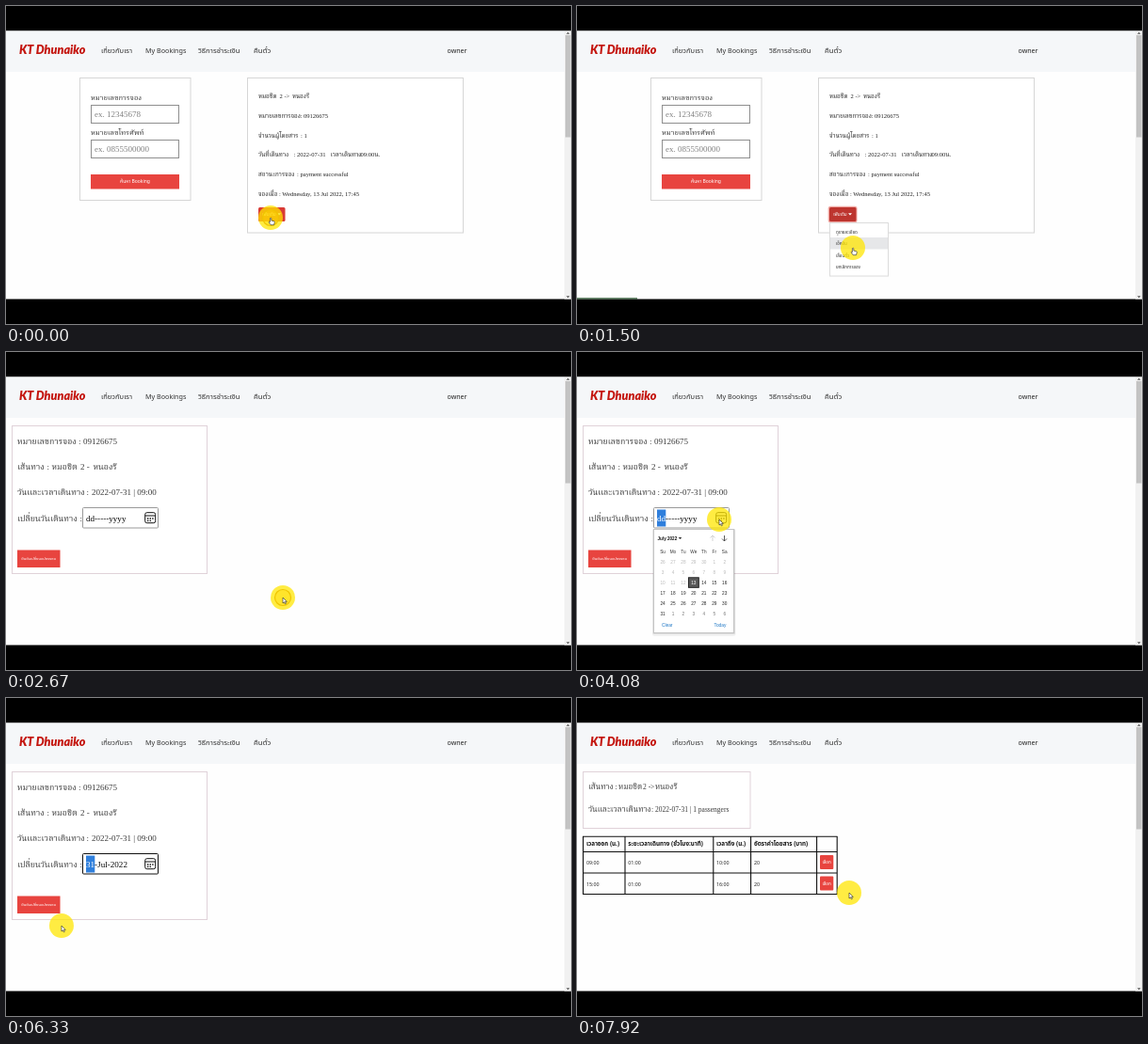
Recreate the animation shown at these times as an HTML page. Size 600 by 338 pixels, loop 8000 ms.

```html
<!DOCTYPE html>
<html lang="th">
<head>
<meta charset="utf-8">
<title>Booking</title>
<style>
html, body { margin: 0; width: 100%; height: 100%; overflow: hidden; background: #000; }
svg { display: block; width: 600px; height: 338px; }
.serif { font-family: "Liberation Serif", "Noto Serif Thai", "Noto Serif", serif; }
.sans { font-family: "Noto Sans", "Noto Sans Thai Looped", "Noto Sans Thai", sans-serif; }
.ui { font-family: "Liberation Sans", sans-serif; }
.brand { font-family: Lato, sans-serif; font-weight: 900; font-style: italic; }
</style>
</head>
<body>
<svg id="stage" viewBox="0 0 600 338"></svg>
<script>
const LOOP = 8000, RED = '#e8443f';
const stage = document.getElementById('stage');

function add(parent, tag, attrs = {}, content) {
  const el = document.createElementNS('http://www.w3.org/2000/svg', tag);
  for (const k in attrs) el.setAttribute(k, attrs[k]);
  if (content !== undefined) el.textContent = content;
  parent.appendChild(el);
  return el;
}
const group = parent => add(parent, 'g');
const box = (g, x, y, w, h, fill, more) => add(g, 'rect', { x, y, width: w, height: h, fill, ...more });
const frame = (g, x, y, w, h, stroke, more) => box(g, x, y, w, h, '#fff', { stroke, ...more });
const path = (g, d, more) => add(g, 'path', { d, ...more });
const text = (g, x, y, size, str, cls = 'serif', fill = '#333', more) =>
  add(g, 'text', { x, y, 'font-size': size, class: cls, fill, ...more }, str);
const label = (g, x, y, size, str) =>
  text(g, x, y, size, str, 'sans', '#fff', { 'text-anchor': 'middle' });
const show = (el, on) => el.setAttribute('display', on ? 'inline' : 'none');

// One line of mixed script: alternating x positions and strings.
function line(g, y, thai, latin, fill, ...parts) {
  for (let i = 0; i < parts.length; i += 2) {
    const str = parts[i + 1];
    text(g, parts[i], y, /[\u0e00-\u0e7f]/.test(str) ? thai : latin, str, 'serif', fill);
  }
}

// Browser window and navigation bar
box(stage, 0, 0, 600, 338, '#000');
box(stage, 0, 26.5, 600, 285, '#fefefe');
box(stage, 0, 26.5, 593, 43.5, '#f5f7f9');
box(stage, 593, 26.5, 7, 285, '#f1f1f1');
box(stage, 594, 31, 5.5, 108.5, '#c3c3c3');
path(stage, 'M595 29.8l1.8-2 1.8 2zM595 308.3l1.8 2 1.8-2z', { fill: '#555' });
text(stage, 14, 51, 12.6, 'KT Dhunaiko', 'brand', '#c4160f');
text(stage, 101, 50, 7.6, 'เกี่ยวกับเรา', 'sans');
text(stage, 148, 50, 7.2, 'My Bookings', 'sans');
text(stage, 204, 50, 7.8, 'วิธีการชำระเงิน', 'sans');
text(stage, 263, 50, 7.8, 'คืนตั๋ว', 'sans');
text(stage, 468.5, 50, 7.1, 'owner', 'sans', '#222');

// Page 1: search form and booking
const search = group(stage);
frame(search, 78.5, 76.5, 117.5, 130, '#d6d6d6');
text(search, 90, 100, 7.6, 'หมายเลขการจอง');
frame(search, 90.5, 105.5, 93, 19, '#8f8f8f');
text(search, 94, 118.3, 9, 'ex. 12345678', 'serif', '#808080');
text(search, 90, 136.5, 7.6, 'หมายเลขโทรศัพท์');
frame(search, 90.5, 142.5, 93, 19, '#8f8f8f');
text(search, 94, 155.3, 9, 'ex. 0855500000', 'serif', '#808080');
box(search, 90, 179, 94, 15.5, RED);
label(search, 137, 188.3, 5, 'ค้นหา Booking');

frame(search, 256.5, 76.5, 229, 164.5, '#d6d6d6');
const info = (y, ...parts) => line(search, y, 6.3, 6.55, '#222', ...parts);
info(97.5, 268, 'หมอชิต', 290.5, '2 ->', 304, 'หนองรี');
info(118.5, 268, 'หมายเลขการจอง', 312.5, ': 09126675');
info(139.5, 268, 'จำนวนผู้โดยสาร', 313, ': 1');
info(160.3, 268, 'วันที่เดินทาง', 305.5, ': 2022-07-31', 344.5, 'เวลาเดินทาง', 373, ': 09:00', 391.5, 'น.');
info(181.3, 268, 'สถานะการจอง', 309, ': payment successful');
info(202, 268, 'จองเมื่อ', 290, ': Wednesday, 13 Jul 2022, 17:45');

const ring = box(search, 266.7, 212.7, 30.8, 17.6, '#f0a7a2', { rx: 2.5 });
const more = box(search, 268, 214, 28.5, 15, RED, { rx: 1.5 });
label(search, 279.5, 223.3, 4.6, 'เพิ่มเติม');
path(search, 'M288 220.3h4l-2 2.2z', { fill: '#fff' });

const menu = group(search);
frame(menu, 268.5, 230.5, 62, 56.5, '#dcdcdc');
const hover = box(menu, 269, 246, 61, 12.5, '#e6e7e9');
['ดูรายละเอียด', 'เช็คอิน', 'เลื่อนตั๋ว', 'ยกเลิกการจอง'].forEach((s, i) =>
  text(menu, 275, 241.6 + 12.5 * i, 4.5, s, 'sans'));
const status = box(stage, 0, 310.3, 64, 1.2, '#24502a');

// Page 2: change of travel date
const change = group(stage);
frame(change, 6.5, 78.5, 207, 157, '#e0d2d9');
const field = (y, ...parts) => line(change, y, 8.8, 9, '#3a3a3a', ...parts);
field(98.3, 12, 'หมายเลขการจอง', 77, ':', 82, '09126675');
field(125.3, 12, 'เส้นทาง', 43.5, ':', 48.5, 'หมอชิต', 79, '2 -', 92.5, 'หนองรี');
field(152.3, 12, 'วันและเวลาเดินทาง', 85.5, ':', 91, '2022-07-31 | 09:00');
field(179.5, 12, 'เปลี่ยนวันเดินทาง', 78.5, ':');
const input = frame(change, 81.5, 165.5, 80, 21.5, '#999', { rx: 1 });
const picked = box(change, 85, 167.5, 9.3, 18, '#2f7fdc');
const part = text(change, 85, 180, 9.1, 'dd', 'serif', '#000');
const rest = text(change, 94.1, 180, 9.1, '', 'serif', '#000');
const icon = { fill: 'none', stroke: '#111' };
box(change, 147.7, 170.7, 11, 11, 'none', { ...icon, rx: 2 });
path(change, 'M148 174h10.5', icon);
path(change, 'M150 177h6.8M150 179.3h4.5', { ...icon, 'stroke-width': 1.3, 'stroke-dasharray': '1.4 1.2' });
const confirm = box(change, 12, 210.5, 45.5, 18.5, RED);
const confirmText = label(change, 34.7, 221.2, 4.1, 'ยืนยันเปลี่ยนแปลงรอบ');

// Date picker
const picker = group(change);
box(picker, 80, 188, 88.5, 114, '#000', { opacity: .05, rx: 2 });
box(picker, 80.5, 188, 87.5, 112, '#000', { opacity: .09, rx: 1 });
frame(picker, 81.5, 188.5, 85, 110, '#c4c4c4');
text(picker, 85.5, 199.6, 4.6, 'July 2022', 'ui', '#111', { 'font-weight': 700 });
path(picker, 'M107.8 197h3.4l-1.7 2z', { fill: '#222' });
path(picker, 'M144 201v-6m-2.5 2.5l2.5-2.5 2.5 2.5', { fill: 'none', stroke: '#c8c8c8', 'stroke-width': .8 });
path(picker, 'M156.5 195v6m-2.5-2.5l2.5 2.5 2.5-2.5', { fill: 'none', stroke: '#333', 'stroke-width': .8 });
const cell = (col, y, str, fill) =>
  text(picker, 91 + 10.95 * col, y, 4.7, str, 'ui', fill, { 'text-anchor': 'middle' });
['Su', 'Mo', 'Tu', 'We', 'Th', 'Fr', 'Sa'].forEach((d, i) => cell(i, 214, d, '#333'));
box(picker, 118.5, 239.8, 10.8, 10.5, '#5a5a5a', { stroke: '#222' });
for (let i = 0; i < 42; i++) {
  const day = i - 4;
  const num = day < 1 ? day + 30 : day > 31 ? day - 31 : day;
  const fill = day === 13 ? '#fff' : day < 13 ? '#b9b9b9' : day > 31 ? '#777' : '#222';
  cell(i % 7, 225 + 10.95 * Math.floor(i / 7), num, fill);
}
text(picker, 90, 291.8, 4.8, 'Clear', 'ui', '#1a74c4');
text(picker, 145.5, 291.8, 4.8, 'Today', 'ui', '#1a74c4');

// Page 3: departures
const trips = group(stage);
frame(trips, 6.5, 78.5, 177.5, 60, '#e0d2d9');
const trip = (y, ...parts) => line(trips, y, 8.2, 7.5, '#3a3a3a', ...parts);
trip(96.8, 12, 'เส้นทาง', 40.5, ':', 44, 'หมอชิต', 70, '2 ->', 83, 'หนองรี');
trip(121, 12, 'วันและเวลาเดินทาง', 79, ':', 83, '2022-07-31 | 1 passengers');
path(trips, 'M6 147.3H276.5M6 163.5H276.5M6 186H276.5M6 208.5H276.5' +
  [6.5, 51, 144.8, 184.6, 254.6, 276.2].map(x => `M${x} 147V209`).join(''),
  { fill: 'none', stroke: '#111', 'stroke-width': 1.1 });
const cols = [10, 54.3, 148, 188];
['เวลาออก (น.)', 'ระยะเวลาเดินทาง (ชั่วโมง:นาที)', 'เวลาถึง (น.)', 'อัตราค่าโดยสาร (บาท)'].forEach((s, i) =>
  text(trips, cols[i], 157.3, 6.3, s, 'sans', '#111', { 'font-weight': 700 }));
[['09:00', '01:00', '10:00', '20'], ['15:00', '01:00', '16:00', '20']].forEach((row, r) => {
  const y = 22.5 * r;
  row.forEach((s, i) => text(trips, cols[i], 177 + y, 5.3, s, 'sans', '#222'));
  box(trips, 258, 167 + y, 14.3, 15, RED, { rx: 1 });
  label(trips, 265.1, 176 + y, 4.6, 'เลือก');
});

// Pointer with highlight
const pointer = group(stage);
add(pointer, 'circle', { r: 13, fill: '#ffe600', opacity: .74 });
const click = add(pointer, 'circle', { r: 8.5, fill: '#ffd800', 'fill-opacity': .35, stroke: '#efc400', 'stroke-width': 1.2 });
const skin = { fill: '#fff', stroke: '#222', 'stroke-width': .6, 'stroke-linejoin': 'round' };
const arrow = path(pointer, 'M0 0v6l1.4-1.2 1 2 1-.5-1-1.9h1.9z', skin);
const hand = path(pointer, 'M-.6 .6q.7-1 1.4 0v2.5l2.8 .6q.8.3.6 1.3l-.7 2.7h-3.3l-2.2-3q.3-.9 1.4 0z', skin);

// time, x, y
const moves = [
  [0, 281, 225], [250, 281, 225], [830, 290, 248], [920, 290, 248], [1420, 293, 257],
  [1600, 293, 257], [1750, 294, 261], [2680, 294, 261], [2830, 151, 122], [3000, 151, 122],
  [3080, 152, 173], [3400, 152, 173], [3500, 151, 178], [4100, 151, 178], [4500, 84, 262],
  [4600, 84, 262], [4830, 91, 281], [5850, 91, 281], [6670, 40, 219], [6700, 40, 219],
  [6830, 46, 219], [7330, 46, 219], [7750, 289, 207], [LOOP, 289, 207]
];
const clicks = [[0, 250], [1750, 2720], [3500, 3750], [4670, 5700], [6920, 7100]];

function position(t) {
  const i = moves.findIndex(m => m[0] > t);
  const [t0, x0, y0] = moves[i - 1], [t1, x1, y1] = moves[i];
  const p = (t - t0) / (t1 - t0), k = p * p * (3 - 2 * p);
  return [x0 + (x1 - x0) * k, y0 + (y1 - y0) * k];
}

function draw(t) {
  const [x, y] = position(t);
  const page = t < 2170 ? 1 : t < 7170 ? 2 : 3;
  show(search, page === 1);
  show(change, page === 2);
  show(trips, page === 3);

  const open = t >= 330;
  show(menu, open);
  show(ring, open);
  more.setAttribute('fill', open ? '#bd352f' : '#d93b35');
  const item = Math.floor((y - 233.5) / 12.5);
  show(hover, item >= 0);
  hover.setAttribute('y', 233.5 + 12.5 * item);
  show(status, t >= 1250 && t < 2170);

  const chosen = t >= 4900, focus = t >= 4080 && t < 7000;
  show(picker, focus && !chosen);
  show(picked, focus);
  part.textContent = chosen ? '31' : 'dd';
  part.setAttribute('fill', focus ? '#fff' : '#000');
  rest.textContent = chosen ? '-Jul-2022' : '-----yyyy';
  input.setAttribute('stroke', focus && chosen ? '#111' : '#999');

  const over = page === 2 && x < 58 && y > 210 && y < 230;
  const down = over && t >= 6920 ? 1.5 : 0;
  confirm.setAttribute('fill', over ? '#fb2018' : RED);
  confirm.setAttribute('y', 210.5 + down);
  confirmText.setAttribute('y', 221.2 + down);

  const link = page === 1 || over;
  show(hand, link);
  show(arrow, !link);
  show(click, clicks.some(([a, b]) => t >= a && t < b));
  pointer.setAttribute('transform', `translate(${x} ${y})`);
}

const start = performance.now();
function tick() {
  draw((performance.now() - start) % LOOP);
  requestAnimationFrame(tick);
}
tick();
</script>
</body>
</html>
```
